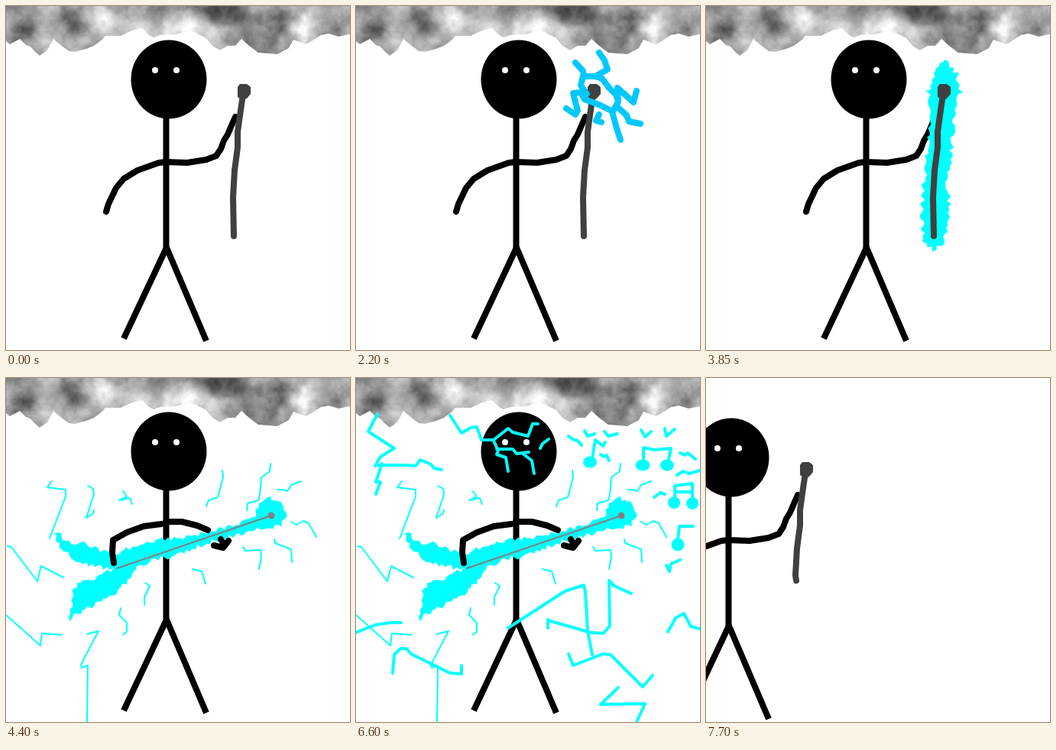
Write an HTML page with a canvas that moves like this. It is 450x450 px and loops after 8250 ms.

```html
<!DOCTYPE html>
<html lang="en">
<head>
<meta charset="utf-8">
<title>Storm guitar</title>
<style>
html, body { margin: 0; width: 100%; height: 100%; overflow: hidden; background: #fff; }
canvas { display: block; width: 450px; height: 450px; }
</style>
</head>
<body>
<canvas id="stage" width="450" height="450"></canvas>
<script>
const SIZE = 450, STEP = 550, STEPS = 15;
const BLUE = '#00c8ff', CYAN = '#00ffff', GREY = '#404040';
const ctx = document.getElementById('stage').getContext('2d');

function line(d, color, width, cap = 'round') {
  ctx.strokeStyle = color;
  ctx.lineWidth = width;
  ctx.lineCap = cap;
  ctx.lineJoin = cap === 'round' ? 'round' : 'miter';
  ctx.stroke(new Path2D(d));
}

function dot(x, y, rx, ry, color) {
  ctx.fillStyle = color;
  ctx.beginPath();
  ctx.ellipse(x, y, rx, ry, 0, 0, Math.PI * 2);
  ctx.fill();
}

function hash(x, y) {
  const n = Math.sin(x * 127.1 + y * 311.7) * 43758.5453;
  return n - Math.floor(n);
}

function noise(x, y) {
  const ix = Math.floor(x), iy = Math.floor(y);
  const ease = v => v * v * (3 - 2 * v);
  const u = ease(x - ix), v = ease(y - iy);
  const a = hash(ix, iy), b = hash(ix + 1, iy);
  const c = hash(ix, iy + 1), d = hash(ix + 1, iy + 1);
  return a + (b - a) * u + (c - a) * v + (a - b - c + d) * u * v;
}

function fbm(x, y) {
  let sum = 0, amp = 0.5, scale = 1 / 30;
  for (let i = 0; i < 5; i++) {
    sum += amp * noise(x * scale + i * 17, y * scale + i * 9);
    amp *= 0.55;
    scale *= 2;
  }
  return sum;
}

// x, y, radius, brightness change
const SHADES = [
  [12, 8, 14, 20], [15, 32, 18, -30], [85, 20, 22, -55], [48, 48, 14, 15],
  [130, 18, 18, 45], [165, 22, 14, 25], [192, 12, 18, -45], [240, 26, 22, 45],
  [270, 8, 20, -55], [302, 25, 20, -45], [335, 55, 22, -60], [345, 12, 22, -35],
  [375, 35, 16, 25], [400, 15, 18, 40], [440, 12, 16, -25]
];

function makeCloud() {
  const c = document.createElement('canvas');
  c.width = SIZE;
  c.height = 66;
  const g = c.getContext('2d');
  const img = g.createImageData(SIZE, 66);
  for (let y = 0, p = 0; y < 66; y++) {
    for (let x = 0; x < SIZE; x++, p += 4) {
      let v = 160 + (fbm(x, y) - 0.53) * 190;
      for (const [sx, sy, r, k] of SHADES) {
        v += k * Math.exp(-((x - sx) ** 2 + (y - sy) ** 2) / (r * r));
      }
      img.data[p] = img.data[p + 1] = img.data[p + 2] = v;
      img.data[p + 3] = 255;
    }
  }
  g.putImageData(img, 0, 0);
  g.globalCompositeOperation = 'destination-in';
  g.fill(new Path2D(`M0 0V46L5 50 18 43 26 51 32 53 36 58 44 65 54 58 62 43 70 50
    82 59 90 60 105 56 115 52 126 44 130 39 150 39 165 32 178 29 187 38 193 41
    202 38 222 37 240 32 250 36 262 42 270 52 280 58 290 52 300 52 308 43 318 52
    330 61 355 63 370 55 376 44 392 50 400 46 412 38 422 36 435 40 450 37V0Z`));
  return c;
}
const cloud = makeCloud();

// Roughens the edges of a polygon with small seeded bumps.
function ragged(points, amount) {
  const path = new Path2D();
  points.forEach(([x, y], i) => {
    const [nx, ny] = points[(i + 1) % points.length];
    const len = Math.hypot(nx - x, ny - y), n = Math.max(1, Math.round(len / 4));
    for (let k = 0; k < n; k++) {
      const off = (hash(i + 3, k + 5) - 0.5) * amount;
      path.lineTo(x + (nx - x) * k / n - (ny - y) / len * off,
                  y + (ny - y) * k / n + (nx - x) / len * off);
    }
  });
  path.closePath();
  return path;
}

const guitarGlow = ragged([
  [63, 203], [70, 205], [82, 215], [100, 216], [120, 224], [140, 230], [165, 222],
  [200, 212], [212, 210], [240, 208], [270, 200], [300, 192], [324, 181], [331, 165],
  [345, 157], [359, 161], [366, 180], [360, 192], [345, 196], [325, 197], [300, 206],
  [270, 214], [240, 225], [215, 235], [195, 236], [172, 247], [163, 262], [150, 274],
  [135, 287], [118, 294], [104, 304], [90, 309], [86, 317], [83, 312], [88, 295],
  [88, 280], [97, 266], [115, 262], [130, 255], [140, 250], [120, 247], [105, 243],
  [88, 240], [80, 229], [68, 217]
], 6);

const staffGlow = ragged([
  [312, 70], [328, 88], [334, 112], [324, 140], [322, 185], [316, 230], [318, 275],
  [310, 310], [297, 320], [285, 308], [282, 270], [286, 225], [290, 180], [295, 140],
  [290, 112], [298, 88]
], 7);

function body() {
  dot(213, 96, 49.5, 51.5, '#000');
  dot(195, 84, 4, 4, '#fff');
  dot(223, 84, 4, 4, '#fff');
  line('M209.5 144V317', '#000', 8, 'butt');
  line('M154 435L210 316 262 438', '#000', 8, 'butt');
}

function raisedArms() {
  line(`M131 269L134 259 144 238 154 226 172 215 200 205 209 204 237 205
    262 201 275 196 281 187 285 176 290 168 296 154 300 145`, '#000', 8);
}

function staff(end) {
  line(`M298 ${end}L297 250 299 215 303 185 303 165 306 143 310 116`, GREY, 8);
  ctx.fillStyle = GREY;
  ctx.fill(new Path2D('M306 102H315L320 106V115L315 121 309 123 303 119V106Z'));
}

// Lightning while the staff is held up
const strikes = {
  1: 'M70 67L45 105 78 118 36 160 66 172 24 206 94 202 116 224 104 239',
  2: `M27 60L8 92 34 104 8 142 30 160 M95 62L82 92 108 106 90 138
    M276 62L286 88 272 106 284 130 M388 54L372 88 398 106 376 142 402 170
    M445 46L424 82 444 102 420 138 438 164`,
  3: `M75 64L52 108 84 130 45 184 74 210 56 252 82 312
    M345 66L332 82 350 92 318 108 M366 62L352 108 371 128 348 170`,
  4: `M318 61L325 71 329 83 313 92 297 92 294 104 302 115
    M287 74L297 85 298 92 M313 92L322 95 331 107 340 116 343 124
    M275 134L287 142 290 137 284 114 294 113 299 122
    M299 122L320 130 336 138 343 125 342 107 363 126 367 111
    M343 133L354 143 357 151 372 154 M335 138L341 160 346 175
    M318 142L314 150 321 152`,
  5: `M318 62L325 74 314 92 297 92 292 112 298 140 290 165 294 205 284 240 288 300 298 312
    M314 92L330 108 324 140 332 165 320 195 328 225 316 250 318 292 300 312
    M340 110L358 126 372 116 M336 180L352 192 360 184
    M260 150L246 172 232 160 M262 270L238 292 246 316 220 340
    M104 120L86 140 76 130 M60 216L34 240 24 226 8 246 M120 310L96 338 82 328 70 360`,
  6: `M415 52L403 55 387 65 376 74 364 90 355 88 345 80 328 95
    M278 74L279 86 285 94 286 101 M256 147L266 161 269 153 280 156
    M243 205L249 211 253 200 260 201 M221 260L235 255 238 246 241 250
    M208 339L201 331 201 317 207 310 214 313 219 322 225 317
    M181 391L212 410 213 404 224 401 M354 231L356 234 358 213 366 213 390 231 397 216
    M388 260L394 262 405 280 411 266 423 281 M388 321L420 381
    M305 396L294 423 320 418 302 450 M374 401L376 411 391 413 391 437 388 440`
};

const surge = [
  `M301 98L304 106 294 121 300 135 300 155 295 168 297 180 290 195 282 212 264 245
    262 260 237 305 248 300 243 312 230 358 236 381 246 372 255 376 265 365 274 336
    288 336 296 323 308 325 324 334`,
  `M324 334L328 355 337 379 347 365 360 380 366 373 364 355 350 335 341 318 347 317
    347 312M341 318L336 295 330 284 350 272M330 284L328 265 320 265 332 242 322 235
    332 222 320 220 328 205 322 200 338 178 320 182 320 165 325 150 320 135 328 122
    326 105 318 97 304 103`,
  `M297 198L286 230 290 246M320 235L298 248 314 290 316 300 306 310 290 307 293 280
    287 265 290 245`
];

const sparks = `M60 135L54 143 78 146 78 155 57 210 M2 220L7 221 41 266 46 246 75 261
  M0 310L45 350 47 334 73 336 M106 335L121 331 98 375 99 379 107 376 106 450
  M107 141L114 145 115 152 105 183 114 177 115 173 M153 148L158 155 148 160 162 157 165 165
  M283 121L284 130 277 156 265 160 262 168
  M346 112L345 122 334 130 332 153 330 160 316 164 315 173
  M355 146L362 146 368 148 373 140 386 135 M373 188L380 192 389 187 396 190 406 208
  M351 211L352 216 373 224 374 241 M310 221L313 226 333 225 334 235 331 250`;
const lowSparks = `M244 250L256 253 261 269 M182 268L188 272 181 287 181 297
  M150 301L148 310 158 320 158 332 153 336`;

const skyBolts = `M28 47L16 70 50 92 32 103 25 115 M26 152L32 136 26 136 34 112
  M26 114L66 114 78 115 84 107 98 113 102 118 112 120 M123 49L138 72 150 65 158 64 164 81`;
const flecks = `M278 76L283 80 290 82 295 88 M299 69L303 76 312 73 M325 70L330 76 342 73
  M320 100L325 103 328 101 331 108 M373 68L378 77 386 70 M404 66L406 76 417 67
  M424 98L430 101 434 98 444 106 M420 127L428 122 436 125 450 121
  M390 156L398 150 404 152 M406 245L410 253 412 243 424 238`;
const faceBolts = `M167 81L180 81 199 66 205 71 225 76 231 60 238 60
  M180 82L186 95 184 100 196 104 199 122 M184 93L205 93 210 99 226 97
  M217 98L230 108 233 125 M241 92L244 86 252 80`;
const floorBolts = `M0 333L25 323 45 320 59 320
  M48 386L50 362 58 354 66 354 72 361 123 386 138 387 138 376
  M199 327L273 279 298 271 300 280 303 330 309 362
  M251 316L251 327M251 317L307 333 324 334 332 324 331 265 338 272 360 282
  M278 361L284 376 323 361 333 362 375 404 388 389
  M371 404M343 405L320 427 378 426 367 450 M408 332L418 314 429 308 438 325 450 328`;

function guitar() {
  ctx.fillStyle = CYAN;
  ctx.fill(guitarGlow);
  line(sparks, CYAN, 2);
  line(lowSparks, CYAN, 2);
  line('M145 249L347 180', '#808080', 2);
  dot(347, 180, 4.5, 4.5, '#808080');
  line('M141 242L139 228 140 212 158 202 180 194 203 191', '#000', 8);
  line('M209 188L230 188 250 193 264 199', '#000', 8);
  line('M272 219L284 222 291 213 M281 211L286 219', '#000', 8);
}

function notes(step) {
  dot(306, 110, 9, 7.5, CYAN);
  line('M309 106L313 81 323 89 326 84', CYAN, 4);
  dot(375, 114, 9.5, 7.5, CYAN);
  dot(407, 114, 9, 7.5, CYAN);
  line('M376 110L376 91 391 94 412 92 408 112', CYAN, 4);
  if (step === 9) {
    dot(15, 114, 8.5, 7, CYAN);
    dot(45, 114, 8.5, 7, CYAN);
    line('M18 112L18 89 48 88 48 112', CYAN, 4);
  }
  if (step >= 10) {
    dot(416, 163, 8, 8, CYAN);
    dot(440, 164, 8, 8, CYAN);
    line('M417 160V141L440 138V162M418 149H440', CYAN, 4);
    dot(421, 218, 8.5, 8.5, CYAN);
    line('M421 212L423 194 441 194', CYAN, 4);
  }
}

function draw(step) {
  ctx.fillStyle = step === 13 ? CYAN : '#fff';
  ctx.fillRect(0, 0, SIZE, SIZE);
  if (step === 13) return;
  if (step === 14) {
    ctx.save();
    ctx.translate(-180, 8);
    body();
    raisedArms();
    staff(257);
    ctx.restore();
    return;
  }
  ctx.drawImage(cloud, 0, 0);
  body();
  if (step < 8) {
    raisedArms();
    if (step === 7) {
      ctx.fillStyle = CYAN;
      ctx.fill(staffGlow);
    }
    staff(301);
    if (strikes[step]) line(strikes[step], BLUE, 8);
    if (step === 6) surge.forEach(d => line(d, BLUE, 8));
    return;
  }
  guitar();
  if (step >= 9) notes(step);
  if (step >= 11) {
    line(skyBolts, CYAN, 4);
    line(flecks, CYAN, 4);
  }
  if (step === 12) {
    line(faceBolts, CYAN, 4);
    line(floorBolts, CYAN, 4);
  }
}

function tick() {
  draw(Math.floor(performance.now() / STEP) % STEPS);
  requestAnimationFrame(tick);
}
tick();
</script>
</body>
</html>
```
